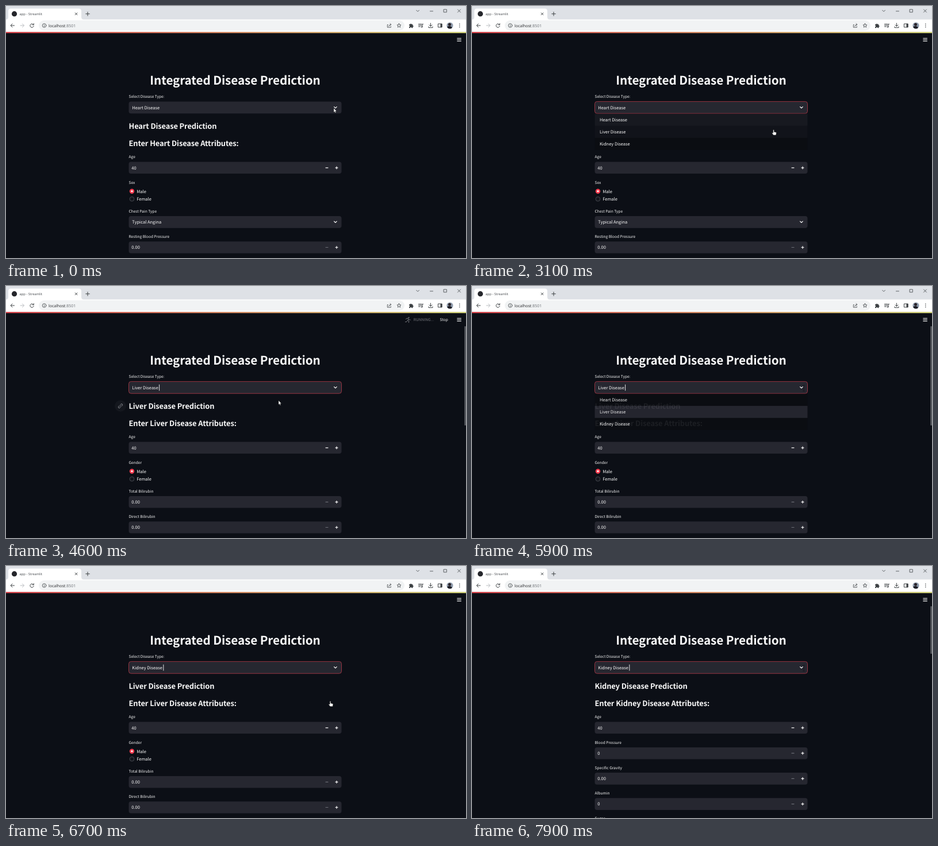
These frames come from a looping animation (800 by 439 pixels, 8 s). An HTML page:

```html
<!DOCTYPE html>
<html lang="en">
<head>
<meta charset="utf-8">
<title>app - Streamlit</title>
<style>
  html, body { margin: 0; width: 100%; height: 100%; overflow: hidden; background: #0c0f16; }
  svg { display: block; width: 100vw; height: 100vh; }
  text {
    font-family: 'Noto Sans CJK JP', 'Noto Sans CJK SC', 'Noto Sans CJK KR', 'Noto Sans', sans-serif;
    font-size: 7.53px; fill: #fafafa; text-rendering: geometricPrecision;
  }
  .title { font-size: 20.7px; font-weight: 700; letter-spacing: -.005em; text-anchor: middle; }
  .heading { font-size: 12.9px; font-weight: 600; letter-spacing: -.01em; }
  .label { font-size: 6.6px; }
  .dim { fill: #75777d; }
  .browser text { font-family: 'Open Sans', 'Noto Sans', sans-serif; font-size: 7px; fill: #202124; }
  .browser .tab { font-size: 5.8px; fill: #45494d; }
  .browser .port { fill: #6b6f74; }
  .line { fill: none; stroke-linecap: round; stroke-linejoin: round; }
</style>
</head>
<body>
<svg viewBox="0 0 800 439">
  <defs>
    <linearGradient id="bar"><stop stop-color="#f0444c"/><stop offset="1" stop-color="#e8ea80"/></linearGradient>
    <clipPath id="face"><circle cx="772" cy="34" r="5.6"/></clipPath>
  </defs>
  <rect width="800" height="439" fill="#0c0f16"/>

  <g class="browser">
    <rect width="800" height="24" fill="#dee1e6"/>
    <path d="M0 23.5Q4 23.5 4 19V9Q4 4.5 8.500 4.500H126.500Q131 4.500 131 9V19Q131 23.500 135 23.500H800V45.500H0Z" fill="#fff"/>
    <circle cx="14.500" cy="13.700" r="4.600" fill="#25262b"/>
    <text class="tab" x="23.500" y="15.800">app - Streamlit</text>
    <rect x="57" y="25" width="636" height="18" rx="9" fill="#f1f3f4"/>
    <text x="74" y="36.600">localhost<tspan class="port">:8501</tspan></text>

    <g class="line" stroke="#3c4043" stroke-width="1">
      <path d="M120.300 11.900l3.600 3.600m0-3.600l-3.600 3.600M142 10.500v6.500M138.800 13.700h6.500"/>
      <path d="M713.700 7.300l2.400 2.400 2.400-2.400M737.500 9h5M761.500 6h4.800v4.800h-4.800zM785.500 6l5 5m0-5l-5 5" stroke-width=".8"/>
      <path d="M14.500 34H8.300M11 31l-3 3 3 3"/>
      <path d="M25 34h6.200M28.500 31l3 3-3 3" stroke="#b9bcc0"/>
      <path d="M47.600 32.200A3.200 3.200 0 1 0 48.200 35M48.300 30.600v2.200h-2.300"/>
      <path d="M66.500 33.800v2M66.500 32.100v.1" stroke-width=".8"/>
      <circle cx="66.500" cy="34" r="3.300" stroke-width=".8"/>
      <path d="M664.300 32.500h-1v4.700h6v-1.500M665.500 35.500q.5-3.200 4-3.200M668 30.500l2 1.800-2 1.800" stroke-width=".8"/>
      <path d="M683.500 30.500l1 2.300 2.500.2-1.900 1.600.6 2.500-2.200-1.300-2.200 1.300.6-2.500-1.900-1.600 2.500-.2z" stroke-width=".8"/>
      <path d="M717.500 31.500h5.500M717.500 33.700h5.500M717.500 35.900h3M724 36.500v-5h1.500"/>
      <circle cx="723" cy="36.500" r=".8"/>
      <path d="M738.500 30v5M736 33l2.500 2.400 2.500-2.400M735 36v1.700h7V36"/>
      <rect x="751.800" y="31" width="6.400" height="6"/>
    </g>
    <path d="M701 32h2a1.200 1.200 0 0 1 2.400 0h2v2a1.200 1.200 0 0 1 0 2.400v1.800h-2a1.200 1.200 0 0 0-2.400 0h-2v-2a1.200 1.200 0 0 0 0-2.400zM755.500 31h2.700v6h-2.700z" fill="#3c4043"/>
    <g fill="#3c4043"><circle cx="788.800" cy="31.200" r=".8"/><circle cx="788.800" cy="34" r=".8"/><circle cx="788.800" cy="36.800" r=".8"/></g>
    <g clip-path="url(#face)">
      <rect x="766" y="28" width="12" height="12" fill="#8f9cad"/>
      <circle cx="771.500" cy="32.300" r="2.500" fill="#2a2429"/>
      <ellipse cx="771" cy="39" rx="5" ry="4" fill="#1b1c24"/>
    </g>
  </g>

  <rect y="45.300" width="800" height="1.900" fill="url(#bar)"/>
  <path class="line" d="M784.800 56.300h6.600m-6.600 2.500h6.600m-6.600 2.500h6.600" stroke="#fafafa" stroke-width="1"/>
  <text class="title" x="398.500" y="136.900">Integrated Disease Prediction</text>
  <g id="page"></g>
</svg>

<script>
const LOOP = 8000, STEP = 100;
const LEFT = 213.5, WIDTH = 370;
const page = document.getElementById('page');
const diseases = ['Heart Disease', 'Liver Disease', 'Kidney Disease'];
const caretX = [268, 266.6, 273.8];
const thumbHeight = [143, 173, 83];

// [time, x, y] of the pointer's hot spot
const pointerPath = [
  [0, 570, 178], [100, 430, 172], [200, 139, 156], [1100, 139, 156],
  [2000, 576, 176], [2100, 579, 179], [2900, 579, 179], [3100, 524.5, 215.2],
  [4200, 524.5, 215.2], [4600, 474, 199.5], [5000, 480, 204], [5300, 602, 260],
  [5700, 577, 178], [5900, 577, 178], [6300, 564, 235], [6700, 564, 235],
  [7500, 560, 232], [7900, 577, 178], [8000, 577, 178]
];

const between = (t, a, b) => t >= a && t < b;
const ramp = (t, a, b) => Math.min(1, Math.max(0, (t - a) / (b - a)));
const smooth = u => u * u * (3 - 2 * u);
const stage = (t, first, second) => t < first ? 0 : t < second ? 1 : 2;

const text = (x, y, str, cls = '') => `<text x="${x}" y="${y}" class="${cls}">${str}</text>`;
const rect = (x, y, w, h, fill, extra = '') =>
  `<rect x="${x}" y="${y}" width="${w}" height="${h}" fill="${fill}" ${extra}/>`;
const stroke = (d, color, width) =>
  `<path class="line" d="${d}" stroke="${color}" stroke-width="${width}"/>`;

const label = (y, str) => text(LEFT, y + 2.3, str, 'label');

function selectBox(y, value, focused) {
  const border = focused ? 'stroke="#b83a4a" stroke-width=".8"' : '';
  return rect(LEFT, y - 10.4, WIDTH, 20.8, '#262730', `rx="4" ${border}`) +
    text(219.3, y + 2.7, value) +
    stroke(`M570.6 ${y - 1.2}l2.300 2.300 2.300-2.300`, '#fafafa', 1.3);
}

function numberField(y, name, value) {
  const mid = y + 19;
  return label(y, name) + rect(LEFT, mid - 10.3, WIDTH, 20.6, '#262730', 'rx="4"') +
    text(218.300, mid + 2.7, value) +
    stroke(`M556 ${mid}h4`, Number(value) ? '#fafafa' : '#6b6d75', 1.2) +
    stroke(`M573 ${mid}h4m-2-2v4`, '#fafafa', 1.2);
}

function radios(name) {
  return label(307.2, name) +
    '<circle cx="219" cy="322.700" r="4.200" fill="#fa3d50"/><circle cx="219" cy="322.700" r="1.600" fill="#fff"/>' +
    '<circle cx="219" cy="336.200" r="3.900" fill="#14161d" stroke="#5a5c64" stroke-width=".7"/>' +
    text(227.2, 325.5, 'Male') + text(227.2, 339, 'Female');
}

const forms = [
  () => radios('Sex') + label(357.3, 'Chest Pain Type') + selectBox(376.3, 'Typical Angina') +
    numberField(401.5, 'Resting Blood Pressure', '0.00'),
  () => radios('Gender') + numberField(357.3, 'Total Bilirubin', '0.00') +
    numberField(401.5, 'Direct Bilirubin', '0.00'),
  () => numberField(307.2, 'Blood Pressure', '0') + numberField(351.4, 'Specific Gravity', '0.00') +
    numberField(395.6, 'Albumin', '0') + label(439.8, 'Sugar')
];

function form(kind) {
  return text(LEFT, 213.8, diseases[kind] + ' Prediction', 'heading') +
    text(LEFT, 244.2, `Enter ${diseases[kind]} Attributes:`, 'heading') +
    numberField(262.8, 'Age', '40') + forms[kind]();
}

function menu(t) {
  const opacity = t < 4500 ? ramp(t, 2400, 2700) - ramp(t, 4100, 4300)
                           : ramp(t, 5640, 5920) - ramp(t, 6300, 6500);
  if (opacity <= 0) return '';
  const toLiver = ramp(t, 3000, 3200), toKidney = ramp(t, 6000, 6300);
  const glow = [(1 - toLiver) ** 1.1, toLiver ** 2 * (1 - toKidney), toKidney];
  return `<g opacity="${opacity}">` + rect(LEFT, 187.8, WIDTH, 63, '#0b0d12') +
    diseases.map((name, i) =>
      rect(LEFT, 187.8 + 21 * i, WIDTH, 21, '#262730', `opacity="${glow[i]}"`) +
      text(222, 200.9 + 21 * i, name)).join('') + '</g>';
}

function linkIcon(y) {
  return `<g transform="translate(199 ${y})"><circle r="10" fill="#14171e"/><g transform="rotate(-45)">` +
    stroke('M-1 -1.700h-1.800a1.700 1.700 0 0 0 0 3.400h1.800M1 -1.700h1.800a1.700 1.700 0 0 1 0 3.400h-1.800M-1.700 0h3.400', '#8b8d93', .9) +
    '</g></g>';
}

function runningStatus() {
  return '<circle cx="700.500" cy="55" r="1.100" fill="#75777d"/>' +
    stroke('M695.500 57.500l2.500-1.500 2.300 1.300-1.800 2.700 2.300 1.200-.5 2.500M698 60.500l-1.500 2h-2M700.300 57.500l1.200 1.500h1.600', '#75777d', 1) +
    text(708.800, 61.2, 'RUNNING...', 'label dim') + text(754.500, 61.2, 'Stop', 'label');
}

function pointer(t, overMenu) {
  const next = Math.max(1, pointerPath.findIndex(key => key[0] >= t));
  const [t0, x0, y0] = pointerPath[next - 1], [t1, x1, y1] = pointerPath[next];
  const u = smooth(ramp(t, t0, t1));
  const x = x0 + (x1 - x0) * u, y = y0 + (y1 - y0) * u;
  const inColumn = between(x, LEFT, LEFT + WIDTH);
  let shape;
  if (overMenu && inColumn && between(y, 187, 251)) {
    shape = '<path d="M-.8 .700Q0-.300 .800 .700V4l3.400 .900Q5 5.200 4.800 6.300L4.200 9.700H-.200L-2.700 6.600Q-2.800 5.300-1.700 5.600L-.800 6.200Z" fill="#fff" stroke="#111" stroke-width=".5"/>';
  } else if (t > 0 && inColumn && between(y, 166, 187)) {
    shape = '<g opacity=".6">' + stroke('M-1.500 -5h3M0 -5v10M-1.500 5h3', '#0b0c10', .7) + '</g>';
  } else {
    shape = '<path d="M0 0V7.200L1.600 5.700 2.700 8.200 3.900 7.700 2.800 5.200H5Z" fill="#fff" stroke="#111" stroke-width=".4"/>';
  }
  return `<g transform="translate(${x} ${y})">${shape}</g>`;
}

function scene(t) {
  const chosen = stage(t, 4200, 6400);
  const shown = stage(t, 4500, 6900);
  const focused = t >= 2500;
  const overMenu = between(t, 3000, 4300) || between(t, 6000, 6800);
  const running = between(t, 4500, 5000) || between(t, 6900, 7500);
  const caretOn = focused && Math.floor(t / 500) % 2 === 1;

  return label(157.6, 'Select Disease Type:') + selectBox(176.8, diseases[chosen], focused) +
    (caretOn ? rect(caretX[chosen] - .4, 171.600, .9, 10.800, '#fafafa') : '') +
    form(shown) +
    (between(t, 4500, 5100) ? linkIcon(209) : '') +
    (between(t, 6900, 7500) ? linkIcon(239.5) : '') +
    menu(t) +
    (running ? runningStatus() : '') +
    (t >= 100 && !overMenu ? rect(797.4, 70, 2.4, thumbHeight[shown], '#5f6168', 'rx="1"') : '') +
    pointer(t, overMenu);
}

let drawn = -1;
function tick() {
  const t = Math.floor(performance.now() % LOOP / STEP) * STEP;
  if (t !== drawn) page.innerHTML = scene(drawn = t);
  requestAnimationFrame(tick);
}
tick();
</script>
</body>
</html>
```
